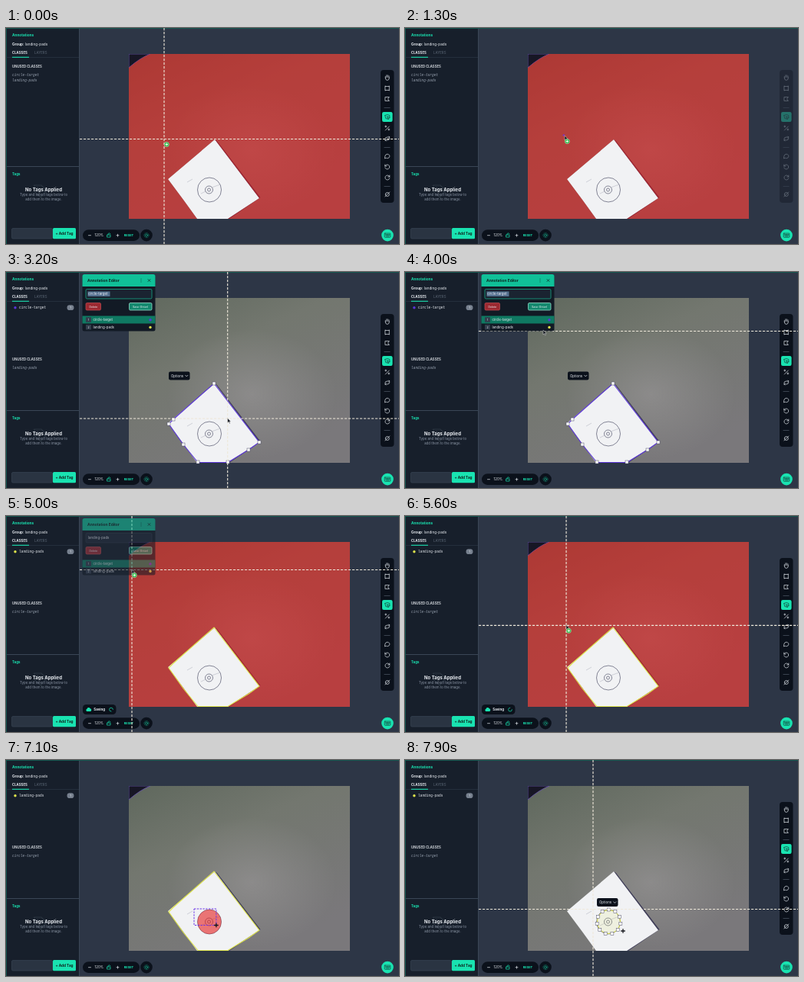
Recreate the animation shown at these times as an HTML page. Size 512 by 283 pixels, loop 8 s.

```html
<!DOCTYPE html>
<html lang="en">
<head>
<meta charset="utf-8">
<title>Annotation tool</title>
<style>
  html, body { margin: 0; width: 100%; height: 100%; overflow: hidden; background: #2d3646; }
  svg { display: block; width: 100vw; height: 100vh; }
  text { font-family: Inter, sans-serif; font-size: 4.4px; fill: #e9edf2; }
  .b { font-weight: 700; }
  .teal { fill: #19e3b1; }
  .dim { fill: #8b95a5; }
  .mid { text-anchor: middle; }
  .small { font-size: 3.5px; }
  .mono { font-family: "Liberation Mono", monospace; font-size: 4.5px; }
  .unused { font-style: italic; fill: #9aa4b2; }
  .black { fill: #0b111b; }
  .icon { fill: none; stroke: #dfe4ea; stroke-width: .7; stroke-linecap: round; stroke-linejoin: round; }
  .red { fill: #e61818; fill-opacity: .58; }
  .cross { stroke: #eee8da; stroke-width: 1.1; stroke-dasharray: 3.2 1.8; }
  .handles rect { fill: #fff; stroke: #4a4a66; stroke-width: .5; }
</style>
</head>
<body>
<svg id="stage" viewBox="0 0 512 283" preserveAspectRatio="none">
  <defs>
    <linearGradient id="grass" x2=".6" y2="1">
      <stop offset="0" stop-color="#5f685d"/>
      <stop offset=".4" stop-color="#73776f"/>
      <stop offset="1" stop-color="#7a787b"/>
    </linearGradient>
    <radialGradient id="glow">
      <stop offset="0" stop-color="#a6a2a5" stop-opacity=".45"/>
      <stop offset="1" stop-color="#a6a2a5" stop-opacity="0"/>
    </radialGradient>
    <clipPath id="frame"><rect x="160" y="34" width="288" height="216"/></clipPath>
  </defs>

  <rect width="512" height="283" fill="#2d3646"/>

  <g clip-path="url(#frame)">
    <rect x="160" y="34" width="288" height="216" fill="url(#grass)"/>
    <ellipse cx="320" cy="160" rx="110" ry="85" fill="url(#glow)"/>
    <path d="M160 34H188Q175 39 160 52Z" fill="#171625" stroke="#6a58b0" stroke-width=".8"/>
    <path d="M272 146L275 148 331.500 222 291 250H285Z" fill="#3f3d58"/>
    <path id="pad" d="M272 146L330 223 289 250H249L231 225 211 198Z" fill="#f1f2f4"/>
    <g fill="none" stroke="#55566e" stroke-width=".7">
      <ellipse cx="265" cy="212" rx="15.5" ry="16"/>
      <circle cx="264.5" cy="212" r="5"/>
      <circle cx="264.5" cy="212" r="2"/>
      <path d="M254 217L260 214M268 209L279 205M236 202L243 198" stroke="#a9aab8" stroke-width=".5"/>
    </g>
    <path id="ground" class="red" fill-rule="evenodd"
      d="M188 34H448V250H160V52Q175 39 188 34ZM272 146L330 223 289 250H249L231 225 211 198Z"/>
    <path id="padRed" class="red" d="M272 146L330 223 289 250H249L231 225 211 198Z"/>
    <ellipse id="circleRed" class="red" cx="265" cy="212" rx="15.5" ry="16"/>
  </g>
  <path id="outline" d="M271 146L330 223 316 233 289 249.5H250L231 226 212 199 218 193Z" fill="none" stroke-width="1.1"/>
  <g id="padHandles" class="handles"></g>
  <g id="circleShape">
    <path id="ring" fill="#e2e34c" fill-opacity=".12" stroke="#d5d83f"/>
    <g id="ringHandles" class="handles"></g>
  </g>
  <rect id="box" fill="none" stroke="#6a35e8" stroke-dasharray="2.4 1.4"/>

  <!-- sidebar -->
  <rect width="96" height="283" fill="#171f2b"/>
  <path d="M0 181.5H96M95.5 0V283" stroke="#3a4656"/>
  <path d="M0 .5H512M.5 0V283" stroke="#14574f"/>
  <text x="8" y="11" class="b teal" style="font-size:4.7px">Annotations</text>
  <text x="8" y="23" style="font-size:4.7px"><tspan class="b">Group:</tspan> landing-pads</text>
  <text x="8" y="34" class="b" style="font-size:4.3px">CLASSES</text>
  <text x="37" y="34" style="fill:#5d6877">LAYERS</text>
  <path d="M0 38.5H95" stroke="#2c3745" stroke-width=".7"/>
  <path d="M8 38.3H30" stroke="#19e3b1" stroke-width="1.1"/>
  <g id="used">
    <circle id="usedDot" cx="12" cy="46.7" r="1.7"/>
    <text id="usedName" x="17" y="48.3" class="mono"></text>
    <rect x="79.5" y="43.3" width="9" height="6.8" rx="3.4" fill="#77818f"/>
    <text x="84" y="48.2" class="mid" style="font-size:4px">1</text>
  </g>
  <g id="unused">
    <text x="8" y="52" style="font-size:4.3px;font-weight:600">UNUSED CLASSES</text>
    <text id="free1" x="8" y="62.5" class="mono unused"></text>
    <text id="free2" x="8" y="70" class="mono unused">landing-pads</text>
  </g>
  <text x="8" y="193" class="b teal">Tags</text>
  <path d="M37 206H46L53 213 45 222 37 214ZM41 208v3" fill="none" stroke="#2b3541" stroke-width="1.2"/>
  <text x="49" y="213.5" class="b mid" style="font-size:6px">No Tags Applied</text>
  <text x="49" y="220" class="dim mid">Type and select tags below to</text>
  <text x="49" y="226.3" class="dim mid">add them to the image.</text>
  <rect x="7.5" y="262.5" width="53" height="13.5" rx="1.5" fill="#2a3442" stroke="#3c4858" stroke-width=".6"/>
  <rect x="61" y="262" width="30" height="14.3" rx="1.5" class="teal"/>
  <text x="76" y="270.8" class="b mid" style="font-size:4.7px;fill:#10251f">+ Add Tag</text>

  <!-- zoom bar and buttons -->
  <rect x="100" y="264.3" width="74" height="14.7" rx="7.3" class="black"/>
  <path d="M107.500 271.7h3M144 271.7h3M145.500 270.2v3" class="icon"/>
  <text x="121.3" y="273.3" class="mid">120%</text>
  <path d="M132 271h4v3h-4zM133 271v-1.4q1.6-1.8 3 0" class="icon" style="stroke:#19e3b1"/>
  <text x="160" y="273.2" class="b teal mid" style="font-size:3.9px">RESET</text>
  <circle cx="183" cy="271.6" r="7.8" class="black"/>
  <g class="icon" style="stroke:#19b993">
    <circle cx="183" cy="271.6" r="1.5"/>
    <circle cx="183" cy="271.6" r="3" stroke-dasharray=".5 1.85"/>
  </g>
  <circle cx="497" cy="271.6" r="7.8" class="teal"/>
  <g class="icon" style="stroke:#123c35">
    <rect x="493.2" y="269" width="7.6" height="5.2" rx=".6"/>
    <path d="M494.7 270.6h5M494.7 271.7h5M495.5 273h3.2" stroke-dasharray=".6 .8"/>
  </g>
  <g id="toolbar">
    <rect x="488" y="55" width="17.5" height="174" rx="4" class="black"/>
    <rect x="490" y="110" width="13.6" height="13" rx="2.2" class="teal"/>
    <path d="M492.5 104.5h8M492.5 156.5h8M492.5 207.5h8" stroke="#5b6675" stroke-width=".6"/>
  </g>

  <g id="saving">
    <rect x="100" y="247" width="43.5" height="13" rx="4.5" class="black"/>
    <path d="M105.5 256a1.7 1.7 0 0 1 0-3.2a2.2 2.2 0 0 1 4.2-.5a1.9 1.9 0 0 1 .2 3.7z" class="teal"/>
    <text x="114.3" y="255.3" class="b">Saving</text>
    <circle id="spin" cx="137" cy="253.6" r="2.4" class="icon" style="stroke:#19e3b1" stroke-dasharray="10 6"/>
  </g>

  <path id="crossH" class="cross"/>
  <path id="crossV" class="cross"/>

  <g id="options">
    <rect width="27.5" height="11" rx="2.2" class="black"/>
    <text x="3" y="7">Options</text>
    <path d="M21.7 4.8l1.6 1.6 1.6-1.6" class="icon"/>
  </g>

  <g id="editor">
    <rect x="99.5" y="3" width="95" height="74.5" rx="2.5" fill="#121a25"/>
    <path d="M99.5 19V5.5Q99.5 3 102 3H192Q194.5 3 194.5 5.5V19Z" fill="#10c098"/>
    <text x="106" y="12.8" class="b" style="font-size:4.9px;fill:#0c2823">Annotation Editor</text>
    <path d="M176 9v.1M176 11v.1M176 13v.1M185 9.5l3 3M188 9.5l-3 3" class="icon" style="stroke:#0c2823"/>
    <rect id="input" x="104" y="22.5" width="86" height="12.5" rx="1.5" fill="#1a2431" stroke-width=".7"/>
    <rect id="selection" x="106.5" y="25.5" width="29" height="6.5" fill="#55708f"/>
    <text id="field" x="107" y="30.3"></text>
    <rect x="104" y="40.5" width="19.5" height="9.5" rx="1.5" fill="#9c2931" stroke="#d8565c" stroke-width=".6"/>
    <text x="113.7" y="46.5" class="mid small">Delete</text>
    <rect x="160.5" y="40.5" width="29.5" height="9.5" rx="1.5" fill="#14896f" stroke="#a5ecd9" stroke-width=".7"/>
    <text x="175.2" y="46.5" class="mid small">Save (Enter)</text>
    <rect x="99.5" y="57.5" width="95" height="10" fill="#0f7962"/>
    <path d="M104 59.3h7v6.5h-7zM104 69h7v6.5h-7z" fill="#313d4c"/>
    <text x="107.5" y="64" class="mid small">1</text>
    <text x="107.5" y="73.7" class="mid small">2</text>
    <text x="113.5" y="64.3">circle-target</text>
    <text x="113.5" y="74">landing-pads</text>
    <circle cx="188" cy="62.7" r="1.7" fill="#5a35d8"/>
    <circle cx="188" cy="72.5" r="1.7" fill="#dfe54b"/>
  </g>

  <g id="cursor">
    <path id="arrow" d="M0 0V6L1.5 4.7 2.5 7 3.4 6.6 2.4 4.4H4.2Z" fill="#12161d" stroke="#e6e6e6" stroke-width=".45"/>
    <g id="badge">
      <circle cx="3.3" cy="7.5" r="3.1" fill="#2fbf4a" stroke="#dff3e2" stroke-width=".4"/>
      <path d="M1.5 7.5h3.6M3.3 5.7v3.6" stroke="#fff" stroke-width=".9"/>
    </g>
    <path id="plus" d="M-2.8 0h5.6M0-2.8v5.6" stroke="#14161c" stroke-width="1.3"/>
  </g>
</svg>

<script>
const LOOP = 8000, STEP = 100;
const PURPLE = '#5a35d8', YELLOW = '#dfe54b';
const $ = id => document.getElementById(id);
const attr = (id, values) => { for (const k in values) $(id).setAttribute(k, values[k]); };
const show = (id, on) => attr(id, { opacity: +on });
const within = (t, a, b) => t >= a && t < b;
const ramp = (t, a, b) => Math.min(1, Math.max(0, (t - a) / (b - a)));
const ease = u => u * u * (3 - 2 * u);

// Toolbar icons, each drawn around its own centre
const icons = [
  [65, 'M-2.5 .5v-2M-1-.5v-2.7M.5-.5v-2.7M2.2 0v-2.2M-2.5 .5q0 3 2.5 3t2.7-3.5'],
  [79, 'M-2.5-2.5h5v5h-5zM-2.8-2.8h.6M2.2-2.8h.6M-2.8 2.8h.6M2.2 2.8h.6'],
  [93, 'M-2.5-2.5h5l-1.8 2.5 1.8 2.5h-5z'],
  [116.5, 'M-3-2l3-1 3 1v2M-3-2l1 4 2 .5M0-.5l3.5 1.5-1.5 .6-.6 1.5z', '#123c35'],
  [131, 'M-2.5 3l5-5M-2-3v2M-3-2h2M2 1v2M1 2h2'],
  [145, 'M-3 .5q0-2.5 3-2.5h3M3-.5q0 2.5-3 2.5h-3M2-3l1 1-1 1M-2 1l-1 1 1 1'],
  [168, 'M-3 0a3 2.7 0 1 1 1.5 2.3l-1.5 .5z'],
  [182, 'M-3-3v2h2M-3-1a3 3 0 1 1 0 2'],
  [196, 'M3-3v2h-2M3-1a3 3 0 1 0 0 2'],
  [218, 'M-3 3l6-6M-2.5 0a2.5 2.5 0 1 0 5 0a2.5 2.5 0 1 0-5 0']
];
$('toolbar').innerHTML += icons.map(([y, d, color = '#dfe4ea']) =>
  `<path class="icon" style="stroke:${color}" transform="translate(496.8 ${y})" d="${d}"/>`).join('');

const squares = points => points.map(([x, y]) =>
  `<rect x="${x - 2}" y="${y - 2}" width="4" height="4"/>`).join('');
const corners = [[271, 146], [330, 223], [316, 233], [289, 249], [250, 249], [231, 226], [212, 199], [218, 193]];
const ring = Array.from({ length: 11 }, (_, i) => {
  const a = (i - 2.75) * Math.PI * 2 / 11;
  return [265.5 + 15.5 * Math.cos(a), 212 + 16 * Math.sin(a)];
});
$('padHandles').innerHTML = squares(corners);
$('ringHandles').innerHTML = squares(ring);
attr('ring', { d: 'M' + ring.join('L') + 'Z' });

// Pointer stops: time, x, y
const stops = [
  [0, 206, 145], [1000, 206, 140], [1300, 208, 141], [2400, 339, 245], [2900, 339, 245],
  [3700, 180, 76], [4200, 180, 76], [4600, 164, 70], [5100, 164, 70], [6000, 243, 195],
  [6500, 245, 195], [7400, 284, 224], [LOOP, 284, 224]
];
function pointer(t) {
  const i = stops.findIndex(s => s[0] > t);
  const [t0, x0, y0] = stops[i - 1], [t1, x1, y1] = stops[i];
  const u = ease(ramp(t, t0, t1));
  return [x0 + (x1 - x0) * u, y0 + (y1 - y0) * u];
}

function overPad(x, y) {
  const point = $('stage').createSVGPoint();
  point.x = x;
  point.y = y;
  return $('pad').isPointInFill(point);
}

function preview(t, x, y) {
  if (t < 1800) return 'ground';
  if (t < 2800) return 'padRed';
  if (t < 4700) return '';
  if (t < 6600) return overPad(x, y) ? 'padRed' : 'ground';
  return t < 7000 ? 'padRed' : t < 7600 ? 'circleRed' : '';
}

function drawClasses(t) {
  const made = t >= 2900, renamed = t >= 4500;
  show('used', made);
  attr('usedDot', { fill: renamed ? YELLOW : PURPLE });
  $('usedName').textContent = $('field').textContent = renamed ? 'landing-pads' : 'circle-target';
  attr('unused', { transform: `translate(0 ${made ? 64 : 0})` });
  $('free1').textContent = made && !renamed ? 'landing-pads' : 'circle-target';
  show('free2', !made);
  show('selection', !renamed);
  attr('input', { stroke: renamed ? '#2c3745' : '#19b993' });
}

function draw(t) {
  const [x, y] = pointer(t);
  const first = within(t, 1100, 2800), second = within(t, 6600, 7600);
  const picked = t >= 7600, inEditor = within(t, 3600, 4500);

  const mode = preview(t, x, y);
  for (const id of ['ground', 'padRed', 'circleRed']) show(id, id === mode);

  attr('outline', { stroke: t < 4500 ? PURPLE : YELLOW });
  show('outline', within(t, 2800, 7600));
  show('padHandles', within(t, 2800, 4700));
  show('circleShape', picked);

  const [bx, by] = first ? [206, 140] : [245, 195];
  attr('box', { x: bx, y: by, width: Math.max(0, x - bx), height: Math.max(0, y - by) });
  show('box', first || second);

  const [cx, cy] = picked ? [245, 195] : [x, y];
  attr('crossH', { d: `M96 ${cy + (inEditor ? 1.5 : 0.5)}H512` });
  attr('crossV', { d: `M${cx} 0V283` });
  show('crossH', !first && !second);
  show('crossV', !first && !second && !inEditor);

  const hide = (a, b) => ramp(t, a, a + 200) * (1 - ramp(t, b, b + 200));
  show('toolbar', 1 - Math.max(hide(1170, 2750), hide(6650, 7550)));
  show('editor', ramp(t, 2800, 3000) * (1 - ramp(t, 4800, 5250)));
  attr('options', { transform: picked ? 'translate(250 181)' : 'translate(212 130.5)' });
  show('options', picked || within(t, 2800, 4700));
  show('saving', within(t, 4700, 5700));
  attr('spin', { transform: `rotate(${t * 0.45} 137 253.6)` });
  drawClasses(t);

  attr('cursor', { transform: `translate(${x} ${y})` });
  show('arrow', within(t, 1000, 2000) || within(t, 2900, 6600));
  show('badge', t < 2900 || within(t, 4600, 5800));
  show('plus', t >= 6600);
}

const start = performance.now();
function tick() {
  const t = (performance.now() - start) % LOOP;
  draw(Math.floor(t / STEP) * STEP);
  requestAnimationFrame(tick);
}
tick();
</script>
</body>
</html>
```
